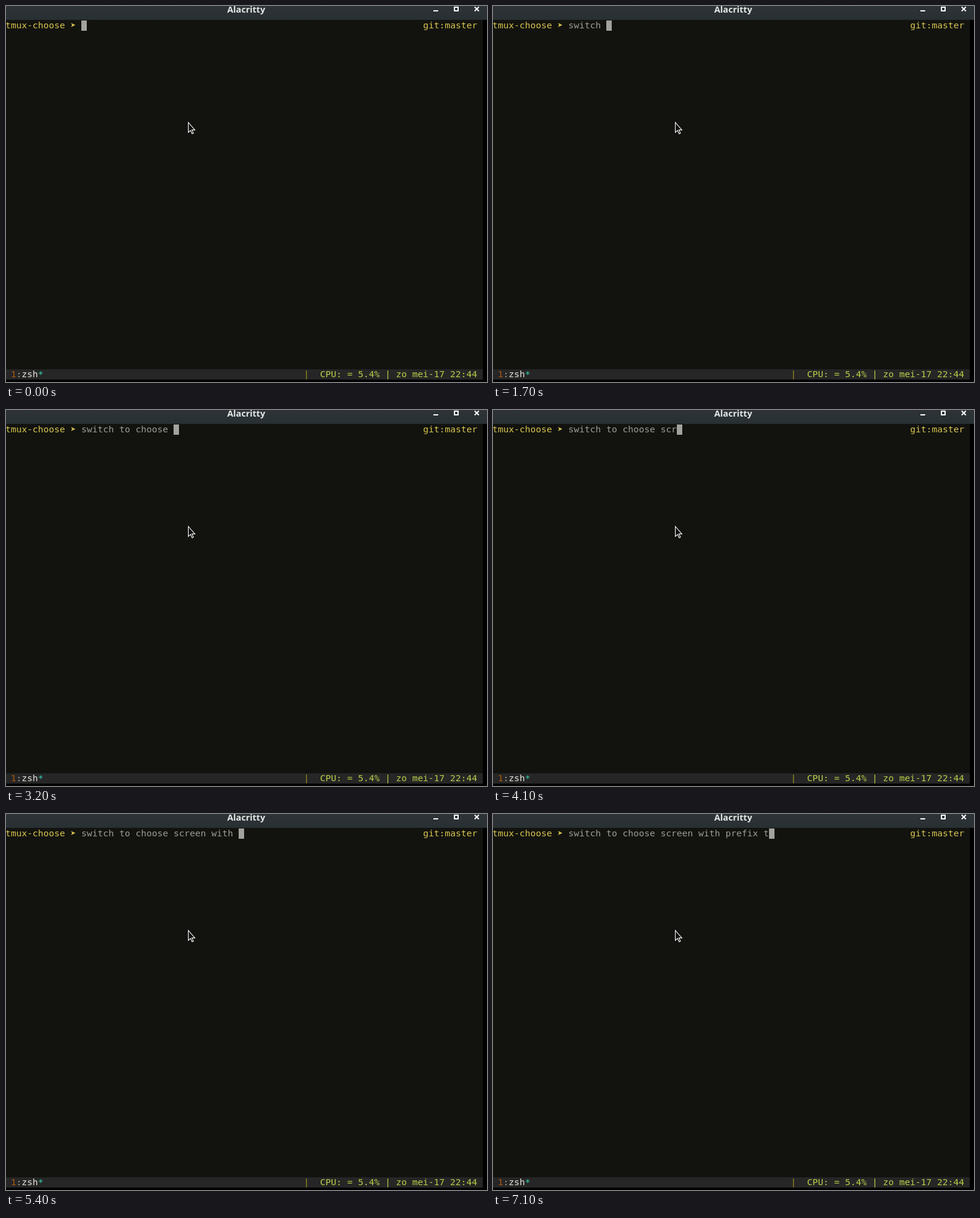
Animation of 798 by 623 pixels, one loop 8000 ms. Source, as an HTML page:

```html
<!DOCTYPE html>
<html lang="en">
<head>
<meta charset="utf-8">
<title>Terminal</title>
<style>
  html, body { margin: 0; width: 100%; height: 100%; overflow: hidden; background: #000; }
  svg { display: block; }
  text { font: 14.95px "DejaVu Sans Mono", monospace; white-space: pre; }
  .title { font: bold 14.6px "Open Sans", "Noto Sans", sans-serif; fill: #e4e7e6; }
  .prompt { fill: #d8c550; }
  .input { fill: #9c9c97; }
  .hint { fill: #505354; }
  .status { fill: #b7d047; }
</style>
</head>
<body>
<svg width="798" height="623" viewBox="0 0 798 623">
  <defs>
    <linearGradient id="bar" x2="0" y2="1">
      <stop stop-color="#2d3336"/>
      <stop offset="1" stop-color="#293033"/>
    </linearGradient>
  </defs>

  <rect width="798" height="623" fill="#000"/>
  <rect width="798" height="23" fill="url(#bar)"/>
  <rect y="23" width="791" height="579" fill="#12130f"/>
  <rect y="602" width="791" height="17" fill="#262626"/>

  <text class="title" x="398.5" y="11" text-anchor="middle">Alacritty</text>
  <g fill="none" stroke="#fff" stroke-width="2">
    <path d="M709 8H717"/>
    <rect x="744" y="2" width="6" height="6"/>
    <path d="M777.5 1.5L784.5 8.5M784.5 1.5L777.5 8.5"/>
  </g>

  <text class="prompt" x="-1" y="37">tmux-choose ➤</text>
  <text class="prompt" x="692" y="37">git:master</text>
  <rect id="cursor" y="24" width="9" height="17" fill="#a3a39e"/>
  <text id="input" class="input" x="125" y="37"></text>
  <g id="hint" class="hint"></g>

  <text x="8" y="615"><tspan fill="#a9590f">1</tspan><tspan fill="#a5a59c">:</tspan><tspan fill="#e6e6df">zsh</tspan><tspan fill="#35d0ae">*</tspan></text>
  <text x="494" y="615" fill="#989018">|</text>
  <text class="status" x="521" y="615">CPU: = 5.4% | zo mei-17 22:44</text>

  <path d="M302.5 193V209.5L306.2 206.2L308.8 211.7L311 210.7L308.5 205.4H313.4Z"
        fill="#111" stroke="#fff" stroke-width="1.1"/>
</svg>
<script>
const LOOP = 8000, CELL = 9, ROW = 17, INPUT_X = 125, BASELINE = 37;
const command = "switch to choose screen with prefix t";

// One time per typed character; equal times are bursts.
const keyTimes = [
  500, 1000, 1100, 1400, 1500, 1600, 1700, 1900, 2000, 2200,
  2400, 2500, 2700, 2900, 2900, 3100, 3200,
  3700, 3900, 4100, 4200, 4400, 4500, 4700,
  4800, 5100, 5100, 5400, 5400,
  5900, 6000, 6000, 6300, 6500, 6700, 7000, 7100
];

// Shell suggestion offered after the first letter only.
const suggestion = [
  'elect ses in $(tmux ls -F "#S"); do',
  'tmux list-windows -t "$ses" -F "#{window_index}: #{window_name}"',
  'done | grep -v zsh'
];

const [cursor, input, hint] = ["cursor", "input", "hint"].map(id => document.getElementById(id));

suggestion.forEach((line, row) => {
  const text = document.createElementNS("http://www.w3.org/2000/svg", "text");
  text.setAttribute("x", row ? -1 : INPUT_X + CELL);
  text.setAttribute("y", BASELINE + row * ROW);
  text.textContent = line;
  hint.append(text);
});

function render(time) {
  const count = keyTimes.filter(t => t <= time).length;
  input.textContent = command.slice(0, count);
  cursor.setAttribute("x", INPUT_X + count * CELL);
  hint.setAttribute("visibility", count === 1 ? "visible" : "hidden");
}

const start = performance.now();
function frame() {
  render((performance.now() - start) % LOOP);
  requestAnimationFrame(frame);
}
frame();
</script>
</body>
</html>
```
